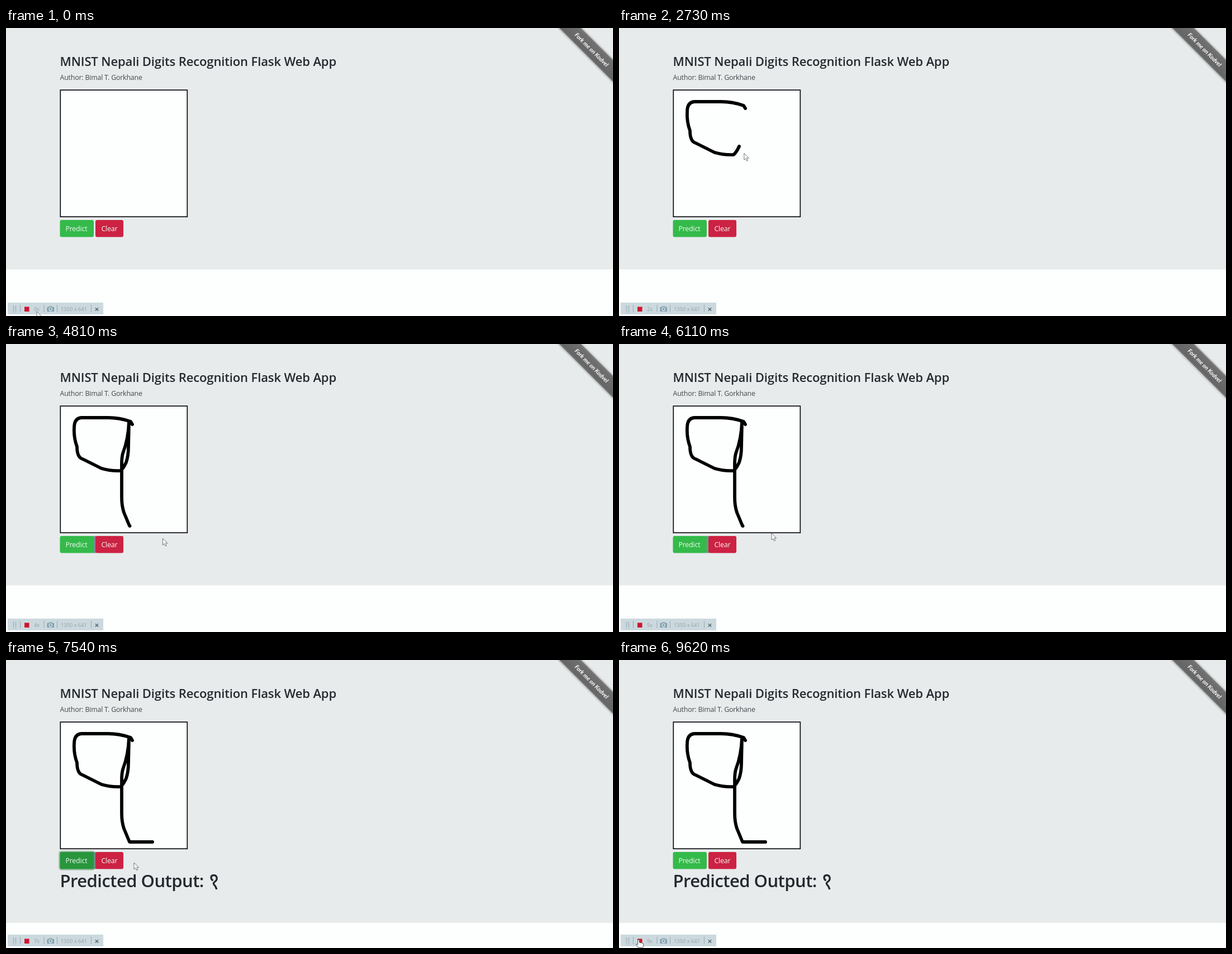
Recreate the animation shown at these times as an HTML page. Size 1086 px wide and 516 px high, loop 9750 ms.

```html
<!DOCTYPE html>
<html lang="en">
<head>
<meta charset="utf-8">
<title>Digit recognition demo</title>
<style>
  html, body { margin: 0; width: 100%; height: 100%; overflow: hidden; background: #fdfefe; }
  svg { display: block; width: 1086px; height: 516px; }
  text { font-family: "Open Sans", "Noto Sans", sans-serif; white-space: pre; }
  .head { font-weight: 600; fill: #23292e; }
  .body { font-size: 12.4px; letter-spacing: -.2px; }
  .btn { fill: #f1f7f2; }
  .tool { font-size: 9.3px; fill: #91a1a7; }
  .fork { font: italic 700 10.4px Lato, sans-serif; fill: #fff; text-anchor: middle; }
</style>
</head>
<body>
<svg viewBox="0 0 1086 516">
  <defs>
    <linearGradient id="band" x2="0" y2="1">
      <stop stop-color="#717171"/><stop offset="1" stop-color="#646464"/>
    </linearGradient>
    <filter id="soft" x="-10%" y="-60%" width="120%" height="220%">
      <feGaussianBlur stdDeviation="2"/>
    </filter>
  </defs>

  <rect id="panel" width="1086" height="432.5" fill="#e7ebec"/>

  <g transform="translate(1048 38.7) rotate(45)">
    <rect x="-110" y="-13.5" width="220" height="27.5" fill="#000" opacity=".45" filter="url(#soft)"/>
    <rect x="-110" y="-13.5" width="220" height="27" fill="url(#band)"/>
    <path d="M-110-12H110M-110 12H110" stroke="#949494" stroke-width=".8" stroke-dasharray="1.6 1.2"/>
    <text class="fork" y="4">Fork me on Kodvel</text>
  </g>

  <text class="head" x="96.5" y="67.5" font-size="22" letter-spacing="-.12">MNIST Nepali Digits Recognition Flask Web App</text>
  <text class="body" x="96.5" y="92.5" fill="#41474b">Author: Bimal T. Gorkhane</text>

  <rect x="97.3" y="111.2" width="227" height="227" fill="#fdfefe" stroke="#0c0c10" stroke-width="1.7"/>
  <path id="ink" fill="none" stroke="#000" stroke-width="5.8" stroke-linecap="round" stroke-linejoin="round"
    d="M226 144L223 139Q203 132 183 132H135Q122 133 122 150Q121 168 127 184Q127 203 137 206L171 223Q188 228 205 227
       Q210 223 215 212Q219 200 219 185L220 139Q219 170 209 196Q207 203 207 215V275Q207 290 211 302L221 326H262"/>

  <rect id="mark" x="156" y="344" width="5" height="30.5" fill="#7c8d97"/>
  <rect id="ring" x="94.2" y="341.7" width="65.1" height="35.1" rx="5" fill="#5a9669" opacity=".5"/>
  <rect id="predict" x="96.5" y="344" width="60.5" height="30.5" rx="3"/>
  <rect id="clear" x="160" y="344" width="50" height="30.5" rx="3"/>
  <text class="body btn" x="106.5" y="363.8">Predict</text>
  <text class="body btn" x="170.5" y="363.8">Clear</text>

  <g id="result">
    <text class="head" x="96.5" y="406.5" font-size="31" letter-spacing="-.53">Predicted Output:</text>
    <path d="M370.5 395C366 393 365.5 386 371 385.6C378 385.2 378.8 393 374.5 396.5C371 399 370.2 400.5 372.8 403.2C375 405.5 376.2 408 376.8 411"
      fill="none" stroke="#23292e" stroke-width="3.3"/>
  </g>

  <rect x="3" y="492" width="171" height="21" fill="#cbd9de"/>
  <path d="M13.5 498V510M17.5 498V510" stroke="#82949b" stroke-width="1.4" stroke-dasharray="1.4 1.4"/>
  <path d="M25.5 496V509M68 496V509M91.5 496V509M152.5 496V509" stroke="#97a9b0"/>
  <rect x="33" y="499.5" width="8.5" height="8.5" fill="#d0142f"/>
  <text id="clock" class="tool" x="50.3" y="506.5"></text>
  <path d="M73.5 500H76L77.5 498.5H82L83.5 500H86V508H73.5Z" fill="#82a0ae"/>
  <circle cx="79.7" cy="503.8" r="2.7" fill="#82a0ae" stroke="#dbe6ea" stroke-width="1.3"/>
  <text class="tool" x="98" y="506.5">1350 x 641</text>
  <path d="M159.8 501.2L165.2 506.6M165.2 501.2L159.8 506.6" stroke="#5f7078" stroke-width="1.6"/>

  <path id="arrow" d="M0 0V12L2.8 9.4L4.7 13.8L6.8 12.9L4.9 8.7H8.6Z" fill="#fbfcfc" stroke="#62686c" stroke-width=".9"/>
  <path id="hand" d="M-1.4 1Q0-1 1.4 1V5.5Q3 4.3 4 6Q5.7 5 6.6 6.7Q8.5 6 8.7 8V11Q8.4 13 7.3 14.5H-.5Q-1.5 12-4.5 9.5Q-5 7.2-3 8L-1.4 9.5Z"
    fill="#fbfcfc" stroke="#4d5357" stroke-width=".9"/>
</svg>
<script>
const $ = id => document.getElementById(id);
const LOOP = 9750, STEP = 130;
const RESULT = 6890, FOCUS = 6760, BLUR = 7930;

const ink = $("ink"), full = ink.getTotalLength();
const FOOT = 41;                        // last piece, drawn when the drag re-enters the box
const START = 1277, SPEED = 0.186, REENTER = 6200;
const END = START + (full - FOOT) / SPEED;
const OFFSET = { x: 9, y: 12 };         // pointer relative to the pen

// pointer stops: ms, x, y
const stops = [
  [0, 55, 508], [START, 235, 156], [END, 230, 338], [4550, 281, 349],
  [6110, 273, 339], [6900, 138, 362], [7540, 229, 363], [8800, 35, 501], [LOOP, 35, 501]
];

const smooth = p => p * p * (3 - 2 * p);

function pointer(t, drawn) {
  if (t >= START && t < END) {
    const pen = ink.getPointAtLength(drawn);
    return [pen.x + OFFSET.x, pen.y + OFFSET.y];
  }
  const i = stops.findIndex(s => s[0] > t);
  const [t0, x0, y0] = stops[i - 1], [t1, x1, y1] = stops[i];
  const p = smooth((t - t0) / (t1 - t0));
  return [x0 + (x1 - x0) * p, y0 + (y1 - y0) * p];
}

const show = (id, on) => $(id).setAttribute("visibility", on ? "visible" : "hidden");
const fill = (id, color) => $(id).setAttribute("fill", color);

function render(t) {
  const drawn = t >= REENTER ? full : Math.min(full - FOOT, Math.max(0, (t - START) * SPEED));
  const [x, y] = pointer(t, drawn);
  const inRow = y > 344 && y < 374.5;
  const onPredict = inRow && x > 96 && x < 157;
  const onClear = inRow && x > 160 && x < 210;
  const onStop = y > 492 && x < 45;
  const focus = t >= FOCUS && t < BLUR;
  const hand = onPredict || onClear || onStop;

  show("ink", drawn > 0);
  ink.setAttribute("stroke-dasharray", `${drawn} ${full + 9}`);

  $("panel").setAttribute("height", t >= RESULT ? 471 : 432.5);
  show("result", t >= RESULT);
  show("mark", t >= END && t < BLUR);
  show("ring", focus);
  fill("predict", focus || onPredict ? "#28963c" : "#34ba4a");
  fill("clear", onClear ? "#b51d3a" : "#cc2243");
  $("clock").textContent = Math.max(0, Math.floor((t - 170) / 1000)) + "s";

  show("arrow", !hand);
  show("hand", hand);
  $(hand ? "hand" : "arrow").setAttribute("transform", `translate(${x} ${y})`);
}

function tick() {
  render(Math.floor(performance.now() % LOOP / STEP) * STEP);
  requestAnimationFrame(tick);
}
tick();
</script>
</body>
</html>
```
